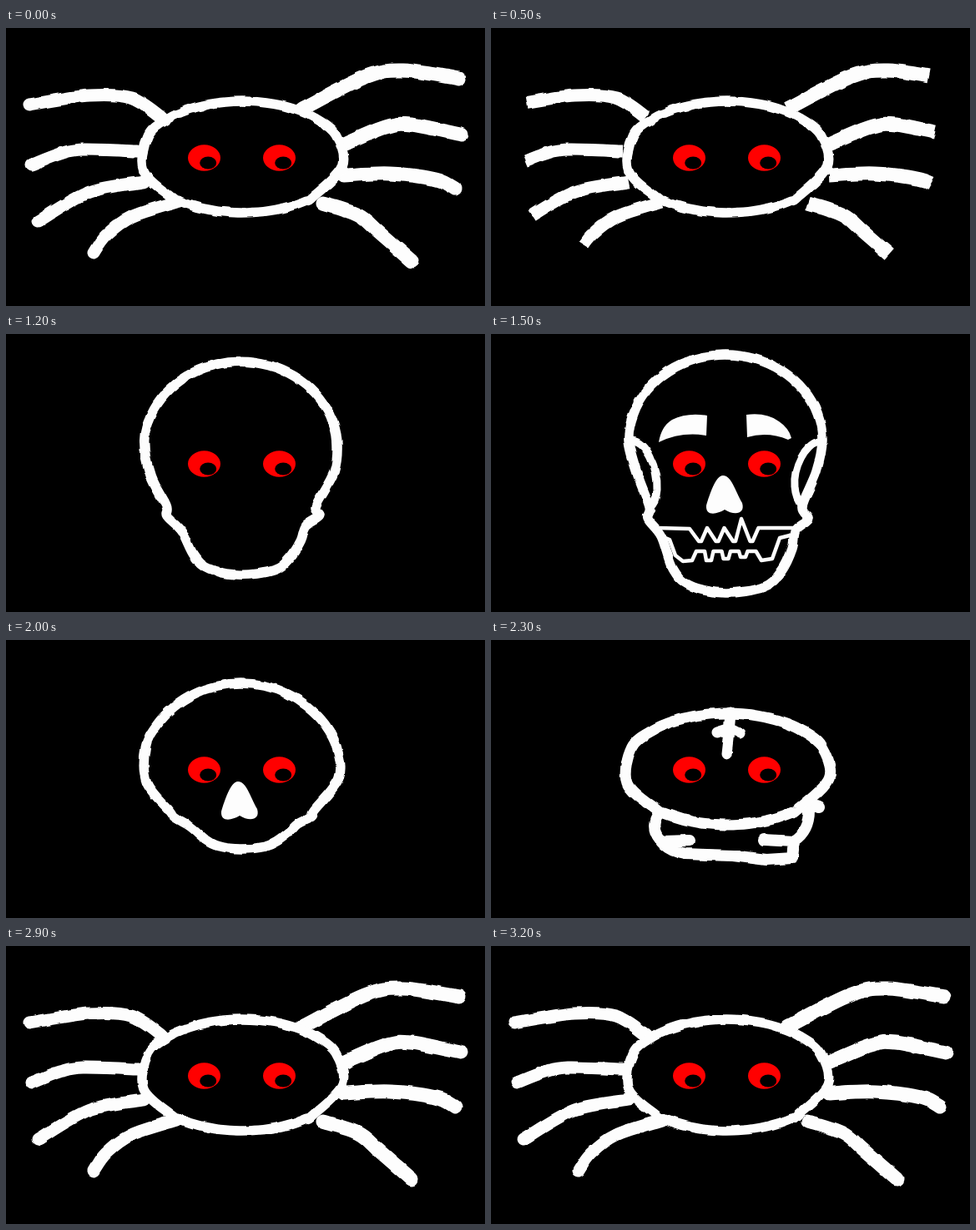
An HTML page that plays this animation: 574 by 334 pixels, repeating every 3300 ms.

```html
<!DOCTYPE html>
<html lang="en">
<head>
<meta charset="utf-8">
<title>Spider and skull</title>
<style>
  html, body { margin: 0; width: 100%; height: 100%; overflow: hidden; background: #000; }
  svg { display: block; width: 574px; height: 334px; }
  .ink { fill: none; stroke: #fdfdfd; stroke-linecap: round; stroke-linejoin: round; }
  .solid { fill: #fdfdfd; }
</style>
</head>
<body>
<svg viewBox="0 0 574 334">
  <filter id="rough" filterUnits="userSpaceOnUse" x="0" y="0" width="574" height="334" color-interpolation-filters="sRGB">
    <feTurbulence id="grain" type="fractalNoise" baseFrequency=".07" numOctaves="1" result="noise"/>
    <feDisplacementMap in="SourceGraphic" in2="noise" scale="5" xChannelSelector="R" yChannelSelector="G"/>
  </filter>
  <rect width="574" height="334"/>
  <g filter="url(#rough)">
    <g id="legs" class="ink"></g>
    <path id="body" class="ink"/>
    <g id="ears" class="ink" stroke-width="9">
      <path d="M169 128C186 130 200 160 199 187Q198 202 190 208"/>
      <path d="M392 129C376 134 362 160 364 183Q365 198 373 206"/>
    </g>
    <g id="jaw" class="ink" stroke-width="14">
      <path d="M202 208Q190 224 203 240Q210 253 233 257L290 259L330 264L361 262L363 242L327 240M205 242L238 241M381 205Q381 229 363 241M390 200L393 201"/>
      <path d="M287 87L285 110L282 137M271 111L287 106L299 112" stroke-width="13"/>
    </g>
  </g>
  <g id="brows" class="solid">
    <path d="M201 130Q204 111 217 103Q235 94 259 98L258 122Q228 117 201 130Z"/>
    <path d="M306 97Q330 94 345 105Q357 113 360 125L356 127Q332 117 307 124Z"/>
  </g>
  <path id="nose" class="solid" d="M278 170C288 170 292 187 301 203C305 217 291 218 280 211C270 217 257 219 258 206C262 193 269 170 278 170Z"/>
  <g id="mouth" class="ink" stroke-width="4.5"><path id="upper"/><path id="lower"/></g>
  <g id="eyes"></g>
</svg>
<script>
const STEP = 100, STEPS = 33;
const CENTER = [283, 155];

const el = id => document.getElementById(id);
const points = text => text.split(' ').map(p => p.split(',').map(Number));
const clamp = v => Math.max(0, Math.min(1, v));
const ramp = (i, start, length) => clamp((i - start) / length) ** 1.4;

function add(parent, tag, attributes) {
  const node = document.createElementNS('http://www.w3.org/2000/svg', tag);
  for (const key in attributes) node.setAttribute(key, attributes[key]);
  return parent.appendChild(node);
}

// Smooth curve through every point.
function curve(pts, closed) {
  const n = pts.length;
  const at = k => pts[closed ? (k + n) % n : Math.max(0, Math.min(n - 1, k))];
  const handle = (p, from, to) => p.map((v, j) => (v + (to[j] - from[j]) / 6).toFixed(1));
  let d = 'M' + pts[0];
  for (let k = 0; k < (closed ? n : n - 1); k++) {
    const [a, b, c, e] = [at(k - 1), at(k), at(k + 1), at(k + 2)];
    d += `C${handle(b, a, c)} ${handle(c, e, b)} ${c}`;
  }
  return d + (closed ? 'Z' : '');
}

const legs = [
  '186,107 150,84 100,81 28,92',
  '158,148 92,146 65,151 31,164',
  '165,185 100,197 39,232',
  '205,209 150,227 120,249 105,270',
  '355,97 430,59 475,51 543,61',
  '405,140 455,119 485,116 545,128',
  '405,177 460,175 515,182 538,193',
  '380,211 422,225 446,245 486,280'
].map(text => add(el('legs'), 'path', { d: curve(points(text)), pathLength: 1 }));

// Skull: half an ellipse for the cranium, then the cheeks and the chin.
const skull = [];
for (let k = 0; k <= 10; k++) {
  const a = Math.PI * k / 10;
  skull.push([281 - 116 * Math.cos(a), 128 - 103 * Math.sin(a)]);
}
skull.push(...points('390,165 373,207 381,222 365,236 361,258 348,285 327,304 280,311 238,302 218,282 204,243 188,222 190,208 176,170'));

function toEllipse([x, y], rx, ry) {
  const [dx, dy] = [x - CENTER[0], y - CENTER[1]];
  const scale = 1 / Math.hypot(dx / rx, dy / ry);
  return [CENTER[0] + dx * scale, CENTER[1] + dy * scale];
}

// Pointed upper teeth, square lower teeth.
const upper = points('200,233 238,234');
const lower = points('204,243 214,247 221,266 230,273 241,272');
for (let k = 0; k < 4; k++) {
  const x = 246 + 20.5 * k;
  upper.push([x + 3, 249], [x + 6, 249], [x + 13, k === 2 ? 222 : 233]);
  lower.push([x, 261], [x + 10, 261]);
  if (k < 3) lower.push([x + 12, 272 - 2 * k], [x + 18, 272 - 2 * k]);
}
upper.push([366, 233]);
lower.push(...points('324,272 337,270 346,245 362,241'));
el('upper').setAttribute('d', 'M' + upper.join('L'));
el('lower').setAttribute('d', 'M' + lower.join('L'));

for (const x of [237.5, 327.5]) {
  add(el('eyes'), 'ellipse', { cx: x, cy: 156, rx: 19.5, ry: 15.7, fill: '#f00' });
  add(el('eyes'), 'ellipse', { cx: x + 4.7, cy: 162, rx: 10, ry: 7.5 });
}

function drawLegs(part, cut, bold) {
  el('legs').style.display = part ? '' : 'none';
  el('legs').style.strokeLinecap = cut ? 'butt' : 'round';
  legs.forEach((leg, k) => {
    leg.setAttribute('stroke-width', bold ? 20 - 2.3 * (k % 4) : k < 4 ? 15 : 17);
    leg.setAttribute('stroke-dasharray', part < 1 ? `${part} 2` : 'none');
  });
}

function drawBody(rise, bold) {
  const outline = skull.map(p => {
    const start = toEllipse(p, bold ? 124 : 122, 67);
    const mix = p[1] < CENTER[1] ? rise : rise ** 2;
    return p.map((v, j) => start[j] + (v - start[j]) * mix);
  });
  el('body').setAttribute('d', curve(outline, true));
  el('body').setAttribute('stroke-width', bold ? 13 : 11.5);
}

function draw(i) {
  const between = (a, b) => i >= a && i <= b;
  const bold = between(21, 28);
  const part = i < 16 ? 1 - ramp(i, 4, 5.5) : ramp(i, 23, 4.4);
  const rise = Math.min(clamp((i - 10) / 2.3), clamp((22 - i) / 3.5));

  el('grain').setAttribute('seed', 1 + i % 5);
  drawLegs(part, i < 16 && part < 1, bold);
  drawBody(rise, bold);

  const spans = { ears: [13, 19], nose: [13, 20], brows: [14, 19], mouth: [14, 18], jaw: [22, 23] };
  for (const id in spans) el(id).style.display = between(...spans[id]) ? '' : 'none';
}

let last = -1;
function tick() {
  const i = Math.floor(performance.now() / STEP) % STEPS;
  if (i !== last) draw(last = i);
  requestAnimationFrame(tick);
}
tick();
</script>
</body>
</html>
```
